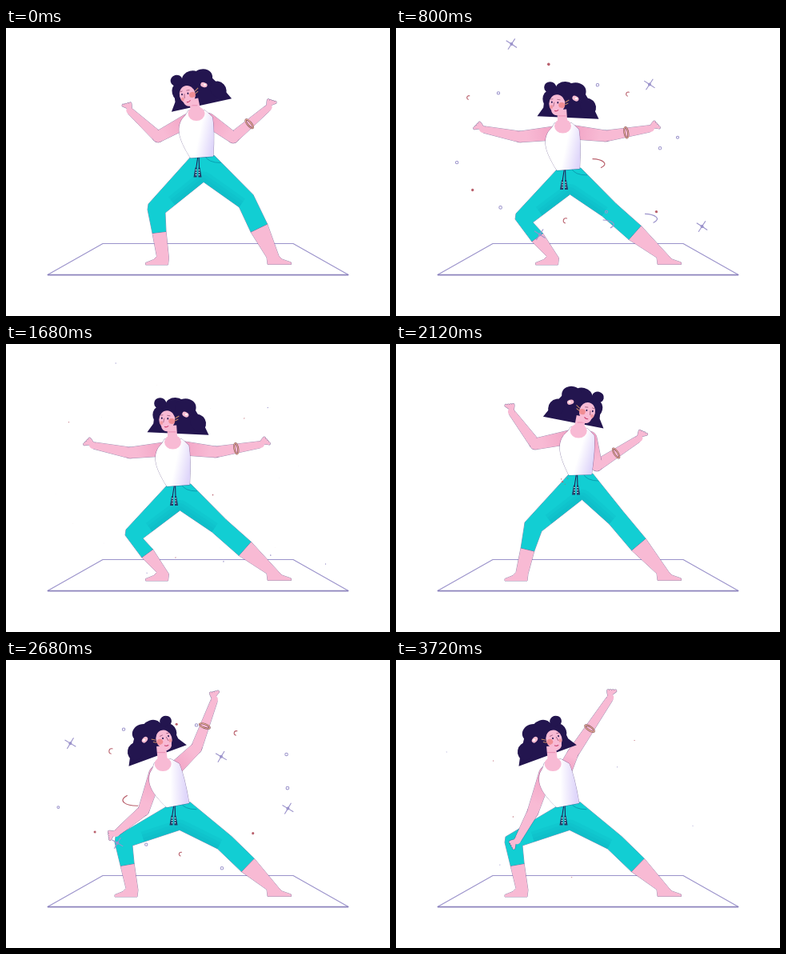
Recreate the animation shown at these times as an HTML page with a canvas. Size 480x360 px, loop 3800 ms.

```html
<!DOCTYPE html>
<html lang="en">
<head>
<meta charset="utf-8">
<title>Yoga flow</title>
<style>
html, body { margin: 0; width: 100%; height: 100%; overflow: hidden; background: #fff; }
canvas { display: block; width: 480px; height: 360px; }
</style>
</head>
<body>
<canvas id="stage" width="480" height="360"></canvas>
<script>
const ctx = document.getElementById('stage').getContext('2d');
const LOOP = 3800, SPINE = 54, STEP = -38.5;
const SKIN = '#f8bad4', HAIR = '#23154f', TEAL = '#12ced3', LINE = 'rgba(67,48,112,.6)';
const LILAC = '#9b93cb', RED = '#b9606c';

// Joints only; every outline is derived from them. body: lean, head tilt (degrees), facing, step.
const rise = {
  hip: [245.5, 160.5], body: [-8, -14, 1, 0], knees: [188, 227, 300, 216],
  left: [190, 136, 152, 101], right: [284, 137, 331, 97]
};
const sink = {
  hip: [224, 168], body: [-8, -6.5, 1, 0], knees: [169, 233, 272, 222],
  left: [167, 142, 124, 110], right: [265, 143, 320, 108]
};
const reach = {
  hip: [216, 176], body: [-8, 1, 1, 0], knees: [160, 239, 266, 227],
  left: [155, 136, 105, 126], right: [262, 135, 322, 125]
};
const turn = {
  hip: [231, 162.5], body: [-3, 12.6, -1, 1], knees: [171, 230, 275, 217],
  left: [174, 125, 142, 82], right: [251, 152, 307, 116]
};
const open = {
  hip: [215.5, 180.5], body: [-21, -18.6, -1, 1], knees: [147, 228, 273, 228],
  left: [172, 188, 135, 219], right: [238, 110, 262, 46]
};
const settle = { ...open, left: [171, 190, 150, 229], right: [221, 117, 270, 44] };

const linear = p => p;
const easeIn = p => p * p;
const easeOut = p => 1 - (1 - p) ** 2;
const smooth = p => p * p * (3 - 2 * p);
const keys = [
  [0, rise, linear], [320, sink, easeOut], [760, reach, linear], [1690, reach, easeIn],
  [2120, turn, easeOut], [2680, open, smooth], [3300, settle, linear], [LOOP, settle, linear]
];

function poseAt(t) {
  const i = keys.findIndex((key, j) => j > 0 && t < key[0]);
  const [t0, a, ease] = keys[i - 1], [t1, b] = keys[i];
  const k = ease((t - t0) / (t1 - t0)), pose = {};
  for (const part in a) pose[part] = a[part].map((v, j) => v + (b[part][j] - v) * k);
  return pose;
}

const rad = deg => deg * Math.PI / 180;
const mix = (a, b, k) => [a[0] + (b[0] - a[0]) * k, a[1] + (b[1] - a[1]) * k];
function offset([x, y], dx, dy, angle = 0) {
  const c = Math.cos(angle), s = Math.sin(angle);
  return [x + dx * c - dy * s, y + dx * s + dy * c];
}
// Two points on either side of p, square to the direction from a to b.
function across(p, a, b, half) {
  const angle = Math.atan2(b[1] - a[1], b[0] - a[0]);
  return [offset(p, 0, half, angle), offset(p, 0, -half, angle)];
}

function poly(points) {
  ctx.beginPath();
  points.forEach(([x, y]) => ctx.lineTo(x, y));
  ctx.closePath();
}

function paint(fill) {
  ctx.strokeStyle = LINE;
  ctx.lineWidth = .9;
  ctx.stroke();
  ctx.fillStyle = fill;
  ctx.fill();
}

function stroke(color, width, draw) {
  ctx.beginPath();
  draw();
  ctx.strokeStyle = color;
  ctx.lineWidth = width;
  ctx.stroke();
}

function oval(x, y, rx, ry, fill, angle = 0) {
  ctx.beginPath();
  ctx.ellipse(x, y, rx, ry, angle, 0, 7);
  ctx.fillStyle = fill;
  ctx.fill();
}

function drawMat() {
  poly([[121, 269.5], [359, 269.5], [428, 308.5], [52, 308.5]]);
  ctx.strokeStyle = LILAC;
  ctx.lineWidth = 1.1;
  ctx.stroke();
  stroke('#8d84bd', 1.7, () => { ctx.moveTo(52, 308.6); ctx.lineTo(428, 308.6); });
}

function limb(a, wa, b, wb, fill) {
  const angle = Math.atan2(b[1] - a[1], b[0] - a[0]), h = Math.PI / 2;
  ctx.beginPath();
  ctx.arc(...a, wa, angle + h, angle + 3 * h);
  ctx.arc(...b, wb, angle - h, angle + h);
  ctx.closePath();
  paint(fill);
}

function drawArm(shoulder, [ex, ey, hx, hy], side) {
  const elbow = [ex, ey], hand = [hx, hy];
  const angle = Math.atan2(hy - ey, hx - ex);
  const blush = ctx.createLinearGradient(...shoulder, ex, ey);
  blush.addColorStop(0, '#f2a5c6');
  blush.addColorStop(.8, SKIN);

  limb(elbow, 6.8, offset(hand, -6, 0, angle), 4.2, SKIN);
  limb(shoulder, 8.5, elbow, 6.8, blush);
  oval(...offset(elbow, 3, 0, angle), 6.2, 6.2, SKIN);

  ctx.save();
  ctx.translate(hx, hy);
  ctx.rotate(angle);
  ctx.scale(1, side);
  ctx.lineCap = 'round';
  for (const [color, width] of [[LINE, 4.2], [SKIN, 3.2]]) {
    for (let i = 0; i < 4; i++) {
      stroke(color, width, () => {
        ctx.moveTo(-5, 1 - i);
        ctx.quadraticCurveTo(i - 1, -5 + i, 2 + i * 1.6, -7 + i * 2.5);
      });
    }
  }
  oval(-4, 0, 5, 4.2, SKIN);
  ctx.restore();

  if (side > 0) {
    ctx.save();
    ctx.translate(...mix(elbow, hand, .43));
    ctx.rotate(angle);
    for (const [color, width] of [['#7c4a5c', 2.2], ['#f0b898', 1]]) {
      stroke(color, width, () => ctx.ellipse(0, 0, 2.3, 6.8, 0, 0, 7));
    }
    ctx.restore();
  }
}

// Foot pointing along dir (-1 left, 1 right), heel below the ankle.
function drawShin(cuff, [x, y], dir, length) {
  const [outer, inner] = cuff;
  poly([outer, [x + 7 * dir, y - 2], [x + 11 * dir, y + 2], [x + length * dir, y + 6],
    [x + length * dir, y + 8.5], [x - 7 * dir, y + 8.5], [x - 8 * dir, y], inner]);
  paint(SKIN);
}

function drawLegs({ hip, knees, body: [lean, , , step] }) {
  const tilt = rad(lean / 2);
  const waistL = offset(hip, -15, 0, tilt), waistR = offset(hip, 15, 0, tilt);
  const crotch = offset(hip, 1.5, 32);
  const kneeL = knees.slice(0, 2), kneeR = knees.slice(2);
  const ankleL = [195.5 + STEP * step, 287.5 - 10 * Math.sin(Math.PI * step)], ankleR = [334, 287];
  const cuffL = across(mix(kneeL, ankleL, .47), kneeL, ankleL, 8.6);
  const cuffR = across(mix(kneeR, ankleR, .48), kneeR, ankleR, 11.5);
  const innerL = offset(kneeL, 11, 4), innerR = offset(kneeR, -8.5, 8);

  drawShin(cuffL, ankleL, -1, 21);
  drawShin([cuffR[1], cuffR[0]], ankleR, 1, 22.5);

  const pants = [waistL, offset(kneeL, -10, -7), offset(kneeL, -11, 0), ...cuffL, innerL, crotch, innerR,
    ...cuffR, offset(kneeR, 9, -7.5), waistR];
  ctx.lineJoin = 'round';
  poly(pants);
  paint(TEAL);
  ctx.save();
  ctx.clip();
  for (const width of [10, 18, 26]) {
    stroke('rgba(9,160,180,.14)', width, () => {
      ctx.moveTo(...mix(innerL, crotch, .25));
      ctx.lineTo(...crotch);
      ctx.lineTo(...innerR);
    });
  }
  const [px, py] = waistR;
  stroke('#0a9fb2', 1, () => {
    ctx.moveTo(px - 12, py);
    ctx.quadraticCurveTo(px - 8, py + 9, px + 8, py + 9);
  });
  ctx.restore();

  const [x, y] = offset(hip, -5, 0);
  for (const side of [-1, 1]) {
    const tx = x + side * 2 - 1;
    stroke(HAIR, 1, () => { ctx.moveTo(x + side * .6, y); ctx.lineTo(tx, y + 16); });
    poly([[tx - 1, y + 14], [tx + 1, y + 14], [tx + 2 + side, y + 26], [tx - 2 + side, y + 26]]);
    ctx.fillStyle = '#203c67';
    ctx.fill();
    for (let i = 0; i < 3; i++) oval(tx, y + 17 + i * 3, .8, .8, '#d9f6fa');
  }
}

function drawTorso(hip, neck, lean) {
  const slope = rad(lean + 8), tilt = rad(lean / 2);
  const at = (dx, dy) => offset(neck, dx, dy, slope);
  ctx.beginPath();
  ctx.moveTo(...at(-10, -4));
  ctx.quadraticCurveTo(...at(-13, 2), ...at(-18, 7));
  ctx.bezierCurveTo(...at(-25, 19), ...at(-22, 32), ...offset(hip, -15, 1, tilt));
  ctx.lineTo(...offset(hip, 13.5, 1, tilt));
  ctx.quadraticCurveTo(...at(23, 20), ...at(20, 4));
  ctx.lineTo(...at(11, -4));
  ctx.closePath();
  const fill = ctx.createLinearGradient(...at(6, 14), ...at(25, 18));
  fill.addColorStop(0, '#fff');
  fill.addColorStop(1, '#dfd6fa');
  paint(fill);
}

function drawHead(neck, tilt, facing) {
  const angle = rad(tilt);
  const center = offset(neck, 6.5 * facing, -10.5);
  const enter = () => {
    ctx.save();
    ctx.translate(...center);
    ctx.rotate(angle);
    ctx.scale(facing || .01, 1);
  };

  enter();
  poly([[-38.5, -1], [-31, -12], [-29, -30], [-12, -40], [16, -38], [31, -14], [38.5, 1]]);
  ctx.fillStyle = HAIR;
  ctx.fill();
  oval(-23, -37.5, 7.5, 7, HAIR);
  oval(-25, -23, 7, 10, HAIR);
  oval(-4, -36, 12, 9, HAIR);
  oval(9, -33, 13, 11, HAIR);
  oval(25, -14, 9.5, 11, HAIR, -.5);
  ctx.restore();

  const jaw = offset(center, -8 * facing, -10, angle);
  stroke(SKIN, 12, () => { ctx.moveTo(...jaw); ctx.lineTo(...neck); });
  oval(...neck, 10.5, 9, SKIN);
  stroke('rgba(222,112,155,.5)', 1.2, () => {
    ctx.moveTo(jaw[0] - 5, jaw[1] + 8);
    ctx.lineTo(jaw[0] + 5, jaw[1] + 8);
  });

  enter();
  oval(-14, -17, 10, 11.5, SKIN);
  oval(-14, -9, 7, 6.5, SKIN);
  oval(-8, -15.5, 4, 3.5, 'rgba(235,112,105,.6)');
  oval(-21, -13, 2, 2.3, 'rgba(235,112,105,.45)');
  oval(-20.5, -19, .9, 1.2, HAIR);
  oval(-13, -18.5, .9, 1.2, HAIR);
  stroke('#8d4a6c', .7, () => {
    ctx.moveTo(-22, -22.5); ctx.lineTo(-19, -23);
    ctx.moveTo(-14, -22.5); ctx.lineTo(-10, -22);
    ctx.moveTo(-17.5, -19); ctx.lineTo(-18.5, -13.5);
  });
  stroke('#c94370', 1.1, () => { ctx.moveTo(-17, -8.5); ctx.quadraticCurveTo(-15, -7, -12, -9.5); });
  stroke('#c68b67', 1, () => {
    ctx.moveTo(-4, -19); ctx.lineTo(1, -22);
    ctx.moveTo(-4, -16); ctx.lineTo(0, -18);
  });
  oval(9, -24, 4.3, 3, '#f7bdd2', .5);
  oval(10, -24, 1.5, 1.1, '#fff');
  ctx.restore();
}

const marks = {
  star(s) {
    stroke(LILAC, 1.1, () => {
      for (let i = 0; i < 4; i++) {
        const a = .55 + i * Math.PI / 2;
        ctx.moveTo(0, 0);
        ctx.lineTo(s * Math.cos(a), s * Math.sin(a));
      }
    });
    oval(0, 0, s * .25, s * .25, LILAC);
  },
  ring(s) { stroke(LILAC, Math.min(1, s), () => ctx.arc(0, 0, s, 0, 7)); },
  dot(s) { oval(0, 0, s, s, RED); },
  arc(s) { stroke(RED, 1.1, () => ctx.arc(0, 0, s * 1.7, 1.7, 5.2)); },
  curl(s, color) {
    stroke(color, 1.2, () => {
      ctx.moveTo(-s, -s * .6);
      ctx.bezierCurveTo(s * .4, -s * .6, s * 1.4, 0, s * .2, s * .6);
    });
  }
};

function random(seed) {
  return () => {
    seed = (seed * 16807) % 2147483647;
    return seed / 2147483647;
  };
}

function makeBurst(start, end, center, seed, stars, curls) {
  const rnd = random(seed), bits = [];
  const small = ['ring', 'dot', 'ring', 'arc'];
  for (const at of stars) bits.push({ at, mark: 'star', size: 8 });
  for (const [x, y, size, color] of curls) bits.push({ at: [x, y], mark: 'curl', size, color });
  for (let i = 0; i < 13; i++) {
    const angle = i * Math.PI * 2 / 13 + rnd() * .4, reach = .6 + rnd() * .4;
    const at = offset(center, 155 * reach * Math.cos(angle), 130 * reach * Math.sin(angle) - 15);
    bits.push({ at, mark: small[i % 4], size: 1.4 + rnd() * .5 });
  }
  return { start, end, center, bits };
}

const bursts = [
  makeBurst(225, 1740, [215, 165], 71,
    [[145, 21], [316, 71], [381, 247], [180, 257]],
    [[254, 169, 9, RED], [319, 237, 9, LILAC], [266, 244, 8, LILAC]]),
  makeBurst(2105, 3750, [211, 175], 29,
    [[78, 103], [270, 120], [355, 186], [138, 230]],
    [[153, 176, -11, RED]])
];

function drawBurst({ start, end, center, bits }, t) {
  const p = (t - start) / (end - start);
  if (p <= 0 || p >= 1) return;
  const spread = (1 - (1 - p) ** 5) / .9;
  const fade = Math.min(1, (1 - p) * 1.7);
  for (const { at, mark, size, color } of bits) {
    const grow = mark === 'star' ? Math.max(0, p - .1) * 5 : p * 9;
    ctx.save();
    ctx.translate(...offset(mix(center, at, spread), 0, 24 * (p * p - .13)));
    ctx.rotate((p - .36) * 1.5);
    marks[mark](size * Math.min(1, grow) * fade, color);
    ctx.restore();
  }
}

function draw(t) {
  const pose = poseAt(t), { hip, body: [lean, tilt, facing] } = pose;
  const neck = offset(hip, 0, -SPINE, rad(lean));
  const slope = rad(lean + 8);
  ctx.fillStyle = '#fff';
  ctx.fillRect(0, 0, 480, 360);
  drawMat();
  drawArm(offset(neck, 15, 8, slope), pose.right, 1);
  drawLegs(pose);
  drawArm(offset(neck, -11, 9, slope), pose.left, -1);
  drawTorso(hip, neck, lean);
  drawHead(neck, tilt, facing);
  bursts.forEach(burst => drawBurst(burst, t));
}

let begin;
function tick(now) {
  begin ??= now;
  draw((now - begin) % LOOP);
  requestAnimationFrame(tick);
}
draw(0);
requestAnimationFrame(tick);
</script>
</body>
</html>
```
